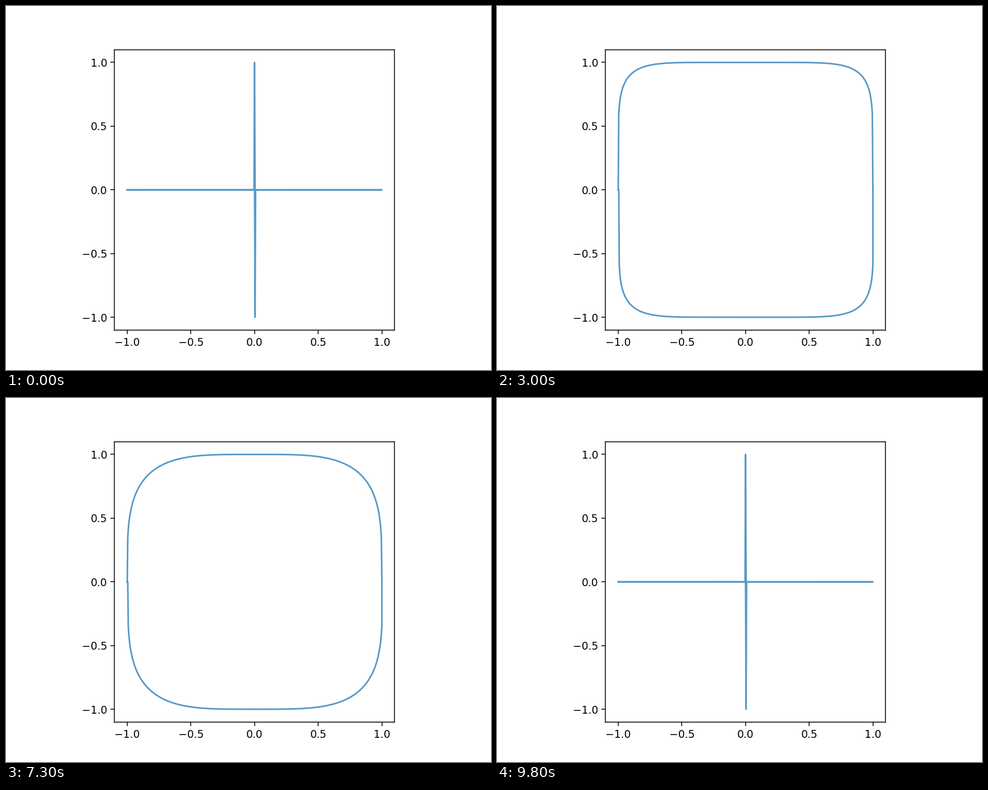
A matplotlib script that plays this animation: 864x648 px, repeating every 10 s.

```python
import numpy as np
import matplotlib.pyplot as plt
from matplotlib.animation import FuncAnimation

HALF = 50
FRAMES = 2 * HALF
INTERVAL = 100

exponents = np.logspace(-1, 2, HALF)
x = np.linspace(-1, 1, 501)
outline_x = np.concatenate([x, x[::-1]])


def outline_y(n):
    """Heights of |x|^n + |y|^n = 1; the lower half runs one sample ahead."""
    top = np.clip(1 - np.abs(x) ** n, 0, 1) ** (1 / n)
    return np.concatenate([top, -top[1:], [0]])


fig, ax = plt.subplots(figsize=(6.4, 4.8), dpi=135)
ax.set_aspect("equal")
ax.set(xlim=(-1.1, 1.1), ylim=(-1.1, 1.1))
ticks = np.linspace(-1, 1, 5)
ax.set_xticks(ticks)
ax.set_yticks(ticks)
curve, = ax.plot(outline_x, outline_y(exponents[0]), color="C0", lw=1.5, alpha=0.75)


def update(frame):
    # The exponent rises, then falls back through the same values.
    step = min(frame, FRAMES - 1 - frame)
    curve.set_ydata(outline_y(exponents[step]))
    return curve,


anim = FuncAnimation(fig, update, frames=FRAMES, interval=INTERVAL,
                     repeat=True, repeat_delay=0)
plt.show()
```
